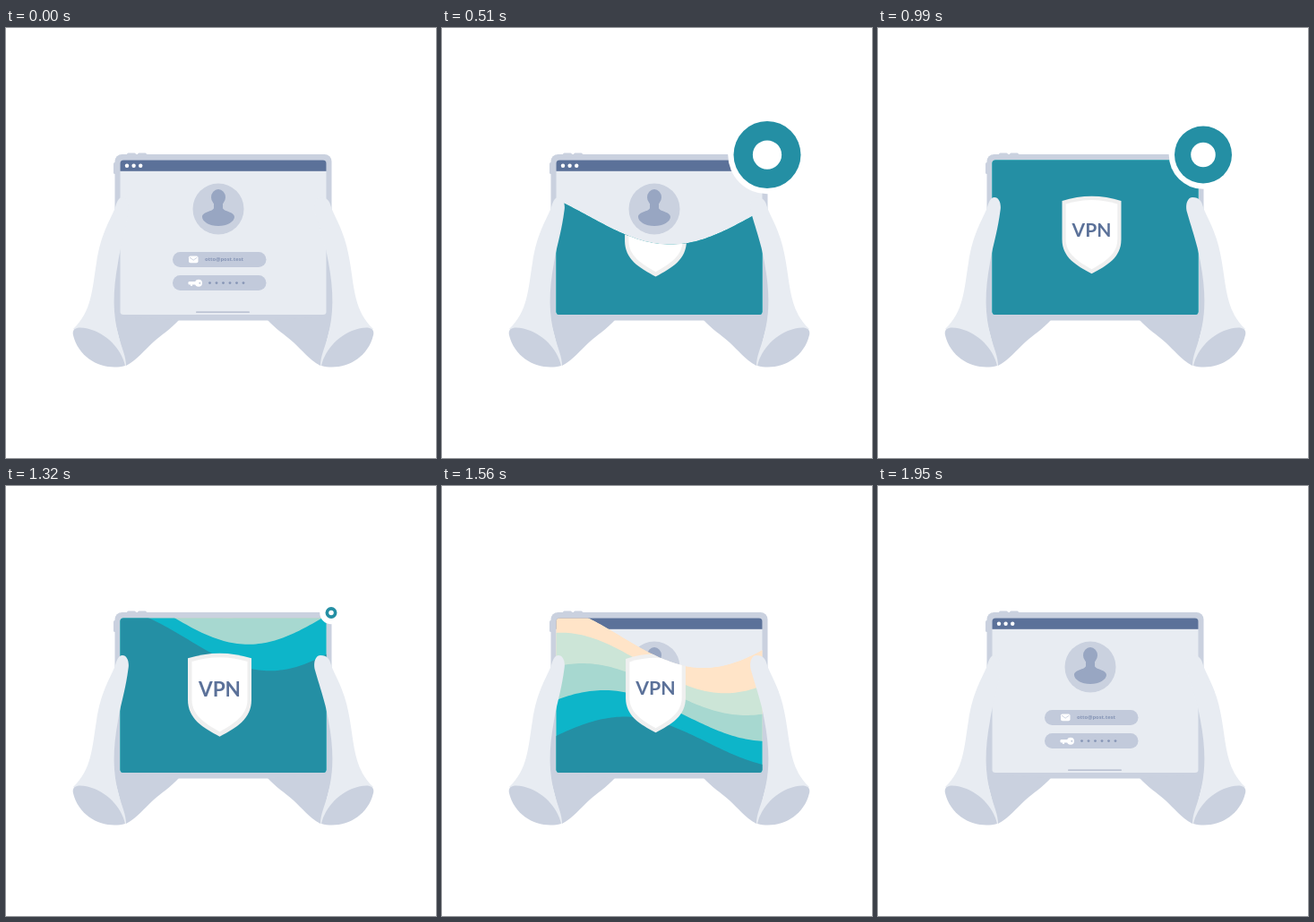
Write an HTML page that moves like this. It is 480 by 480 pixels and loops after 1.98 s.

```html
<!DOCTYPE html>
<html lang="en">
<head>
<meta charset="utf-8">
<title>Secure login on a tablet</title>
<style>
  html, body { margin: 0; width: 100%; height: 100%; overflow: hidden; background: #fff; }
  svg { display: block; width: 100vw; height: 100vh; }
  .shade { fill: #cad1df; }
  .light { fill: #e8ecf2; }
  .navy { fill: #5b7199; }
  .white { fill: #fff; }
  .mid { fill: #98a6c2; }
  .pill { fill: #c2cadb; }
  .vpn { font: 700 21px Lato, "Open Sans", sans-serif; text-anchor: middle; }
  .mail { font: 700 5.8px "Open Sans", Lato, sans-serif; fill: #8796b6; }
</style>
</head>
<body>
<svg viewBox="0 0 480 480">
  <defs>
    <clipPath id="screen"><rect x="127.5" y="147.5" width="230" height="172.5" rx="3.5"/></clipPath>
    <clipPath id="cover"><path id="coverEdge"/></clipPath>
  </defs>

  <g id="tablet" class="shade">
    <rect x="135" y="139.6" width="10" height="4" rx="1.5"/>
    <rect x="147" y="139.6" width="10" height="4" rx="1.5"/>
    <rect x="120" y="150" width="4" height="13" rx="1.5"/>
    <rect x="121.5" y="141" width="242" height="185.5" rx="8"/>
    <path id="palmLeft" d="M128 243C121 270 117 300 120 322L134 377C147 370 154 360 164 351C174 342 184 336 193 326L128 322Z"/>
    <use href="#palmLeft" transform="matrix(-1 0 0 1 485 0)"/>
  </g>

  <g clip-path="url(#screen)">
    <g id="login">
      <rect class="light" x="127" y="147" width="231" height="174"/>
      <rect class="navy" x="127" y="147" width="231" height="12.8"/>
      <g class="white">
        <circle cx="135" cy="153.8" r="2.2"/>
        <circle cx="142.6" cy="153.8" r="2.2"/>
        <circle cx="150.2" cy="153.8" r="2.2"/>
      </g>
      <circle class="shade" cx="237" cy="202" r="28.5"/>
      <g class="mid">
        <ellipse cx="237" cy="189" rx="8" ry="9"/>
        <path d="M232 194H242V201C243 205 255 205 255 211C255 216 247 221 237 221S219 216 219 211C219 205 231 205 232 201Z"/>
      </g>
      <rect class="pill" x="186" y="250" width="104.5" height="17" rx="8.5"/>
      <rect class="pill" x="186" y="276" width="104.5" height="17" rx="8.5"/>
      <rect class="white" x="204" y="254.5" width="10.5" height="7.8" rx="1.8"/>
      <path d="M205 256L209.2 259.2L213.5 256" fill="none" stroke="#c2cadb" stroke-width=".8"/>
      <text class="mail" x="222" y="260.3">otto@post.test</text>
      <path class="white" d="M204 283H213V286.5H208V288H206V286.5H204Q202.500 284.700 204 283Z"/>
      <circle class="white" cx="215" cy="284.7" r="4"/>
      <circle class="pill" cx="216.300" cy="284.700" r="1"/>
      <g id="dots" fill="#8796b6"></g>
      <rect x="212" y="316.500" width="60" height="1.200" rx=".6" fill="#adb6c9"/>
    </g>

    <g clip-path="url(#cover)">
      <g id="bands"></g>
      <g id="shield">
        <path fill="#efefef" d="M205.500 193Q238.500 182.500 271.500 193V236C271.500 256 256 265 238.500 274.300C221 265 205.500 256 205.500 236Z"/>
        <path class="white" d="M209.700 196.500Q238.500 187.500 267.300 196.500V236C267.300 252 254 260.500 238.500 269.300C223 260.500 209.700 252 209.700 236Z"/>
        <text class="vpn navy" x="238.500" y="232.500">VPN</text>
      </g>
    </g>
  </g>

  <g id="hands"></g>

  <g id="badge" transform="translate(363 141.500)">
    <circle id="ring" class="white"/>
    <circle id="disc" fill="#248fa4"/>
    <circle id="spot" class="white"/>
  </g>
</svg>

<script>
const LOOP = 1980, STEP = 30;
const LEFT = 126, RIGHT = 360, BOTTOM = 322;
const SPEED = 0.478, GAP = 29.5;
const COLORS = ["#ffe4c8", "#cce5d7", "#a7d8d0", "#0db5c9", "#248fa4"];

const $ = id => document.getElementById(id);
const clamp = v => Math.min(1, Math.max(0, v));
const easeOut = u => 1 - (1 - u) ** 3;
const smooth = u => u * u * (3 - 2 * u);

function add(parent, name, attrs) {
  const el = document.createElementNS("http://www.w3.org/2000/svg", name);
  for (const key in attrs) el.setAttribute(key, attrs[key]);
  return parent.appendChild(el);
}

// tip: how far the thumb reaches over the screen
function addHand(tip, transform) {
  const g = add($("hands"), "g", { transform });
  add(g, "path", {
    class: "light",
    d: `M${tip - 7} 189C${tip - 2} 189 ${tip + 1} 196 ${tip - 0.5} 204
      C133 230 128 243 125 262C119 294 119 320 126 345C129 357 134 366 134 377
      L75 336C96 316 96 292 101 262C106 228 117 214 122 200C124 193 126 189 ${tip - 7} 189Z`
  });
  add(g, "path", {
    class: "shade",
    d: "M75 343C73 335 80 333 91 335.500C113 341 129 359 133 377C110 383 82 371 75 343Z"
  });
}

// Surface of a wave at mean height mid; its crest drifts sideways with height
function wavePath(mid, crest) {
  const amp = 35 - 6.5 * clamp((mid - 190) / 40);
  let d = `M${LEFT} ${BOTTOM}`;
  for (let x = LEFT; x <= RIGHT; x += 3) {
    const y = mid - amp * Math.cos((x - crest) * Math.PI / 183);
    d += `L${x} ${y.toFixed(2)}`;
  }
  return d + `L${RIGHT} ${BOTTOM}Z`;
}

const fallingWave = mid => wavePath(mid, 87 + 0.81 * (mid - 141));
const risingWave = mid => wavePath(mid, 72 + 0.81 * (mid - 210));

function badgeRadius(t) {
  if (t < 520) return 37.5 * easeOut(clamp((t - 150) / 350));
  if (t < 1110) return 37.5 - 5.5 * smooth(clamp((t - 570) / 420));
  return 32 * (1 - clamp((t - 1110) / 235) ** 2);
}

for (let i = 0; i < 6; i++) add($("dots"), "circle", { cx: 227.5 + 7.5 * i, cy: 284.6, r: 1.4 });
addHand(137, "");
addHand(141, "matrix(-1 0 0 1 485 0)");

const bands = COLORS.map(fill => add($("bands"), "path", { fill }));

function draw(t) {
  const rising = t < 1000;
  const front = 286 + SPEED * (t - 1560);
  const lift = 210 - SPEED * (t - 510);

  $("coverEdge").setAttribute("d", rising ? risingWave(lift) : fallingWave(front - 4 * GAP));
  bands.forEach((band, i) => {
    const solid = rising && i === COLORS.length - 1;
    band.setAttribute("d", solid
      ? `M${LEFT} 146H${RIGHT}V${BOTTOM}H${LEFT}Z`
      : fallingWave(front - (4 - i) * GAP));
  });

  const scale = 1 + 0.038 * (1 + Math.cos(t / 660 * 2 * Math.PI));
  $("shield").setAttribute("transform",
    `translate(238.5 202) scale(${scale}) translate(-238.5 -202)`);

  const r = badgeRadius(t);
  $("ring").setAttribute("r", Math.min(r + 6.3, 2 * r));
  $("disc").setAttribute("r", r);
  $("spot").setAttribute("r", r * 0.43);
}

const start = performance.now();
function tick() {
  const t = (performance.now() - start) % LOOP;
  draw(Math.floor(t / STEP) * STEP);
  requestAnimationFrame(tick);
}
tick();
</script>
</body>
</html>
```
